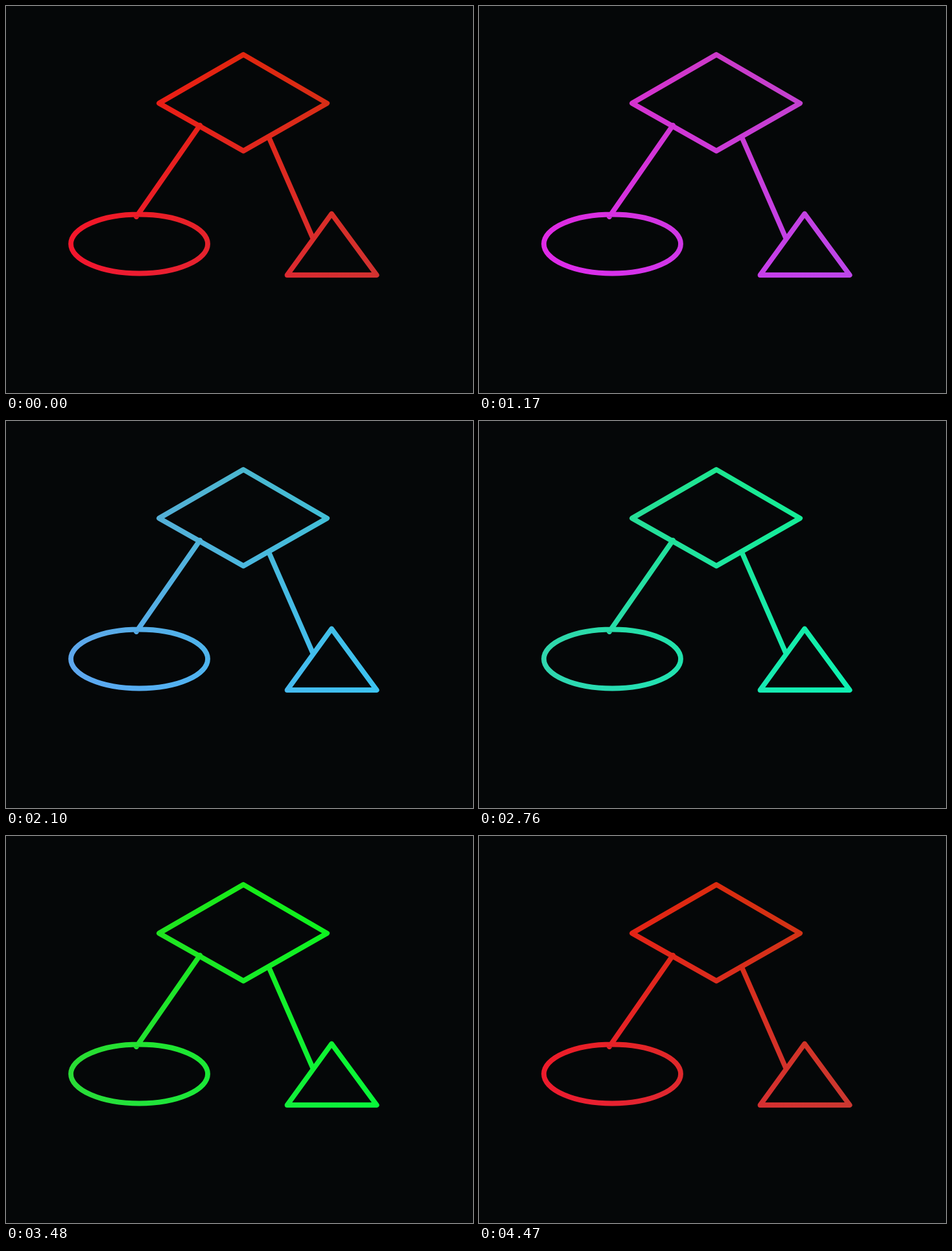
Animation of 720x597 px, one loop 4.5 s. Source, as an HTML page with a canvas:

```html
<!DOCTYPE html>
<html lang="en">
<head>
<meta charset="utf-8">
<title>Colour-cycling shapes</title>
<style>
  html, body { margin: 0; width: 100%; height: 100%; overflow: hidden; background: #050708; }
  canvas { display: block; }
</style>
</head>
<body>
<canvas id="stage" width="720" height="597"></canvas>
<script>
const ctx = document.getElementById('stage').getContext('2d');
const LOOP = 4500, STEP = 30;

// Outline colour at ORIGIN over time: [ms, red, green, blue]
const ORIGIN = { x: 235, y: 150 };
const KEYS = [
  [0, 234, 30, 22],
  [510, 232, 32, 118],
  [1170, 213, 50, 208],
  [2100, 84, 175, 215],
  [2370, 50, 210, 215],
  [2760, 38, 222, 152],
  [3480, 32, 228, 32],
  [LOOP, 234, 30, 22]
];
// Colour change per pixel: red and green along x, blue along y
const SLOPE = { red: -0.07, green: 0.06, blue: 0.1 };

function polygon(path, points, closed) {
  points.forEach(([x, y], i) => i ? path.lineTo(x, y) : path.moveTo(x, y));
  if (closed) path.closePath();
}

const figure = new Path2D();
polygon(figure, [[366, 75], [495, 150], [366, 223.5], [236, 150]], true);
polygon(figure, [[502, 320.5], [571.5, 415], [433.5, 415]], true);
polygon(figure, [[299, 184], [201, 325]]);
polygon(figure, [[405, 202], [473, 358]]);
figure.moveTo(311, 367);
figure.ellipse(205.5, 367, 105.5, 45.5, 0, 0, Math.PI * 2);

function baseColour(time) {
  const next = KEYS.findIndex(key => key[0] > time);
  const from = KEYS[next - 1], to = KEYS[next];
  const part = (time - from[0]) / (to[0] - from[0]);
  return [1, 2, 3].map(i => from[i] + (to[i] - from[i]) * part);
}

function gradient(x0, y0, x1, y1, colourAt) {
  const fill = ctx.createLinearGradient(x0, y0, x1, y1);
  fill.addColorStop(0, colourAt(x0, y0));
  fill.addColorStop(1, colourAt(x1, y1));
  return fill;
}

function draw(time) {
  const [red, green, blue] = baseColour(time);
  ctx.globalCompositeOperation = 'source-over';
  ctx.fillStyle = '#050708';
  ctx.fillRect(0, 0, 720, 597);

  ctx.lineWidth = 7.8;
  ctx.lineCap = ctx.lineJoin = 'round';
  ctx.strokeStyle = gradient(96, 0, 576, 0, x => {
    const dx = x - ORIGIN.x;
    return `rgb(${red + SLOPE.red * dx}, ${green + SLOPE.green * dx}, 0)`;
  });
  ctx.stroke(figure);

  // The blue part is added on top of red and green
  ctx.globalCompositeOperation = 'lighter';
  ctx.strokeStyle = gradient(0, 70, 0, 420, (x, y) =>
    `rgb(0, 0, ${blue + SLOPE.blue * (y - ORIGIN.y)})`);
  ctx.stroke(figure);
}

const start = performance.now();
function tick() {
  const time = (performance.now() - start) % LOOP;
  draw(Math.floor(time / STEP) * STEP);
  requestAnimationFrame(tick);
}
tick();
</script>
</body>
</html>
```
